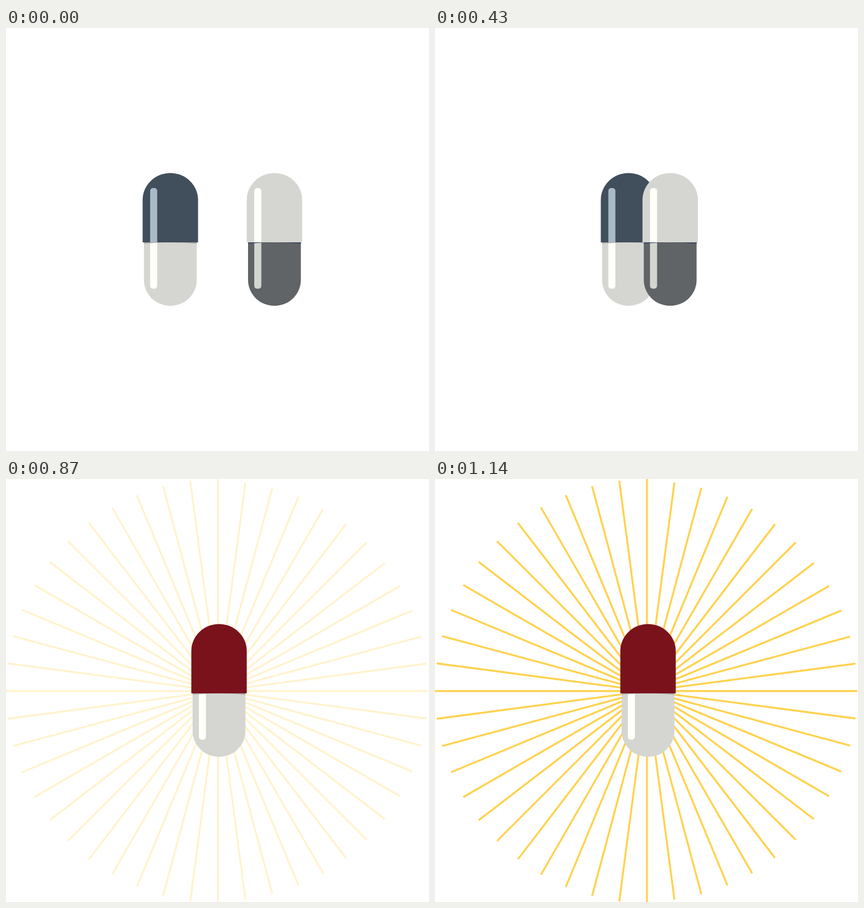
Animation of 748 by 748 pixels, one loop 1970 ms. Source, as an HTML page with a canvas:

```html
<!DOCTYPE html>
<html lang="en">
<head>
<meta charset="utf-8">
<title>Capsules</title>
<style>
html, body { margin: 0; width: 100%; height: 100%; overflow: hidden; background: #fff; }
canvas { display: block; width: 748px; height: 748px; }
</style>
</head>
<body>
<canvas id="stage" width="748" height="748"></canvas>
<script>
const ctx = document.getElementById('stage').getContext('2d');
const LOOP = 1970, TICK = 30;
const SEAM = 379;

const blue = { top: '#414e5b', low: '#d5d6d1', shineTop: '#a9bac7', shineLow: '#fffef8', shade: '#a9a6ad' };
const grey = { top: '#d5d6d1', low: '#606466', shineTop: '#fffff9', shineLow: '#d3d5d0', shade: '#3f4a62' };
const red = { top: '#7a121b', low: '#d5d6d1', shineLow: '#fffef9', shade: '#ada6a9' };

function fillPath(color, build) {
  ctx.fillStyle = color;
  ctx.beginPath();
  build();
  ctx.fill();
}

function capsule(x, c) {
  const mid = x + 49;

  fillPath(c.low, () => {
    ctx.moveTo(x + 2.3, SEAM);
    ctx.lineTo(x + 2.3, 445.5);
    ctx.ellipse(mid, 445.5, 46.7, 45.8, 0, Math.PI, 0, true);
    ctx.lineTo(x + 95.7, SEAM);
  });
  fillPath(c.shineLow, () => ctx.roundRect(x + 13.3, SEAM, 12.5, 82, [0, 0, 5, 5]));

  // thin shadow under the cap, fading out towards the middle
  fillPath(c.shade, () => {
    ctx.moveTo(x + 2.3, SEAM - 1);
    ctx.lineTo(x + 95.7, SEAM - 1);
    ctx.lineTo(x + 95.7, 381.6);
    ctx.quadraticCurveTo(mid, 377.2, x + 2.3, 381.2);
  });

  fillPath(c.top, () => {
    ctx.moveTo(x, SEAM);
    ctx.lineTo(x, 304);
    ctx.ellipse(mid, 304, 49, 47.5, 0, Math.PI, 0);
    ctx.lineTo(x + 98, SEAM);
  });
  if (c.shineTop) {
    fillPath(c.shineTop, () => ctx.roundRect(x + 13.3, 283, 12.5, SEAM - 283, [5, 5, 0, 0]));
  }
}

function rays(alpha) {
  const cx = 374.8, cy = 375;
  ctx.globalAlpha = alpha;
  ctx.strokeStyle = '#ffd24f';
  ctx.lineWidth = 3.4;
  ctx.beginPath();
  for (let i = 0; i < 48; i++) {
    const a = i * Math.PI / 24;
    const r = Math.cos(a) > 0.01 ? 372 : 375;
    // start away from the hub so the strokes never merge into a blot
    ctx.moveTo(cx + 20 * Math.cos(a), cy + 20 * Math.sin(a));
    ctx.lineTo(cx + r * Math.cos(a), cy + r * Math.sin(a));
  }
  ctx.stroke();
  ctx.globalAlpha = 1;
}

// whole ticks elapsed since a moment, limited to a count
function ticks(t, start, max) {
  return Math.max(0, Math.min(max, Math.floor((t - start) / TICK) + 1));
}

function draw(t) {
  ctx.fillStyle = '#fff';
  ctx.fillRect(0, 0, 748, 748);
  if (t < 770) {
    const p = ticks(t, 100, 20) / 20;
    capsule(241.6 + 86 * p, blue);
    capsule(425.7 - 98 * p, grey);
  } else {
    rays(0.2 + 0.8 * ticks(t, 870, 10) / 10);
    capsule(327.7, red);
  }
}

const began = performance.now();
function loop() {
  draw((performance.now() - began) % LOOP);
  requestAnimationFrame(loop);
}
loop();
</script>
</body>
</html>
```
